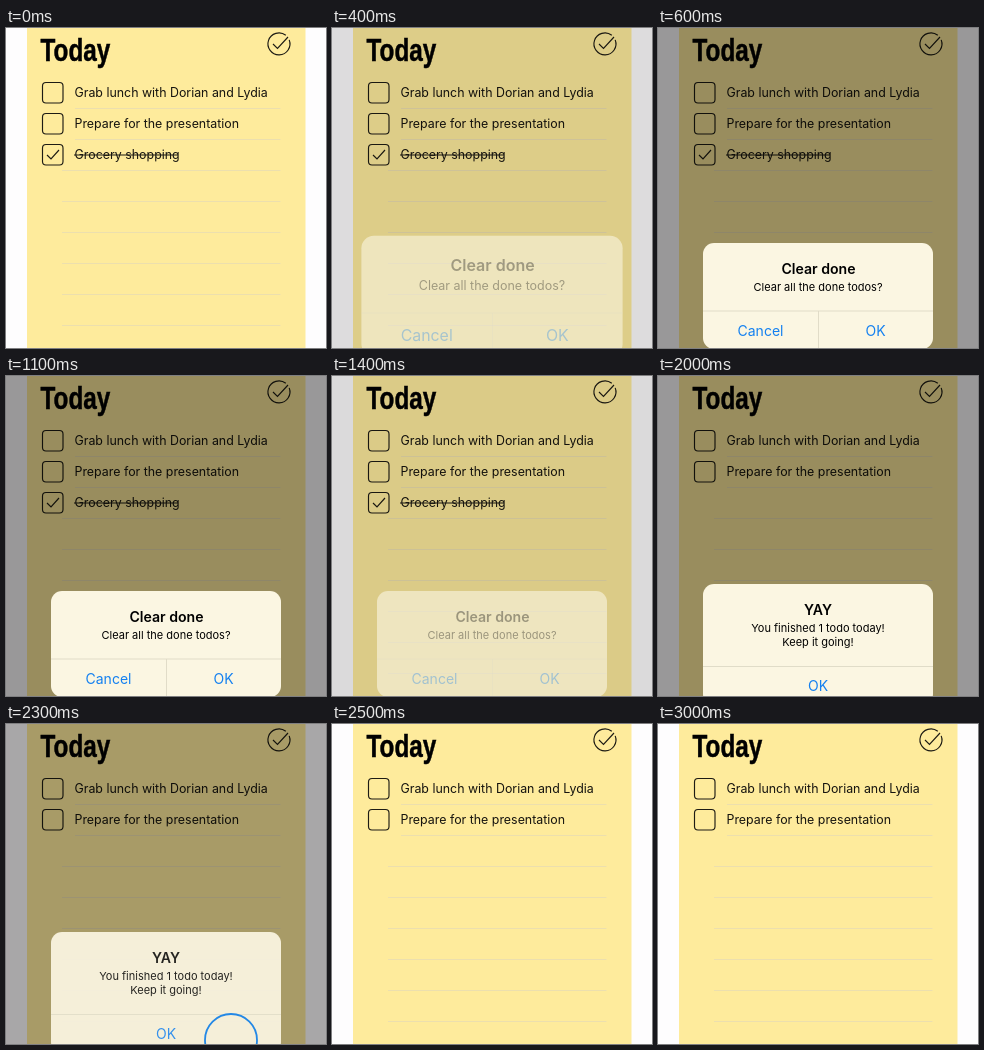
An HTML page for the animation above (3.1 s loop, 320x320 px).

```html
<!DOCTYPE html>
<html lang="en">
<head>
<meta charset="utf-8">
<title>Todo list</title>
<style>
  html, body { margin: 0; height: 100%; overflow: hidden; background: #fefdfe; }
  svg { display: block; width: 320px; height: 320px; }
  text { font-family: Inter, "Liberation Sans", sans-serif; fill: #16140f; }
  .heading { font: bold 32px "Liberation Sans", Arial, sans-serif; fill: #000; stroke: #000; stroke-width: .5; }
  .todo { font-size: 12.4px; }
  .ink { fill: none; stroke: #1d1b14; stroke-width: 1.15; }
  .rule { stroke: #ecdfae; stroke-width: 1; }
  .alert text { text-anchor: middle; fill: #000; }
  .alert .title { font-size: 14.1px; font-weight: 600; }
  .alert .message { font-size: 11px; }
  .alert .button { font-size: 14px; fill: #1480f0; }
  .panel { fill: #fbf6e2; }
  .divider { stroke: #dedac6; stroke-width: .9; fill: none; }
  #tap { fill: none; stroke: #2388e6; stroke-width: 1.8; }
</style>
</head>
<body>
<svg viewBox="0 0 320 320">
  <rect x="21" width="278.5" height="320" fill="#feeb9c"/>
  <g id="rules"></g>
  <text class="heading" transform="translate(34.5 32.500) scale(.76 1)">Today</text>
  <g class="ink">
    <path d="M283.200 11.900A11 11 0 1 1 279.800 7.300"/>
    <path d="M267 16l4.500 4.500L282 9"/>
  </g>
  <g id="todos"></g>
  <g id="done">
    <path class="ink" d="M41 127l4 4 8-9"/>
    <path class="ink" d="M68 127H172"/>
  </g>
  <rect id="dim" width="320" height="320"/>
  <g id="confirm" class="alert">
    <rect class="panel" x="45" y="215" width="230" height="106" rx="11"/>
    <g class="content">
      <path class="divider" d="M45 283H275M160.500 283V321"/>
      <text class="title" x="160.500" y="246">Clear done</text>
      <text class="message" x="160" y="263">Clear all the done todos?</text>
      <text class="button" x="102.500" y="308">Cancel</text>
      <text class="button" x="217.500" y="308">OK</text>
    </g>
  </g>
  <g id="praise" class="alert">
    <rect class="panel" x="45" y="208" width="230" height="121" rx="11"/>
    <g class="content">
      <path class="divider" d="M45 290.500H275"/>
      <text class="title" x="160" y="239">YAY</text>
      <text class="message" x="160" y="256">You finished 1 todo today!</text>
      <text class="message" x="160" y="270">Keep it going!</text>
      <text class="button" x="160" y="315">OK</text>
    </g>
  </g>
  <circle id="tap" r="26"/>
</svg>
<script>
const LOOP = 3100, ENTER = 320, EXIT = 250, CLEARED = 1550;
const ROW = 31, FIRST_ROW = 65;
const $ = id => document.getElementById(id);

const alerts = [
  { node: $('confirm'), open: 280, close: 1250 },
  { node: $('praise'), open: 1590, close: 2240 },
];
const taps = [
  { from: 80, to: 310, x: 273, y: 16 },
  { from: 1150, to: 1350, x: 225, y: 310 },
  { from: 2140, to: 2340, x: 225, y: 316 },
];

const todo = (label, row) => {
  const y = FIRST_ROW + row * ROW;
  return `<rect class="ink" x="36.5" y="${y - 10.5}" width="20.5" height="20.5" rx="3.5"/>
    <text class="todo" x="68.5" y="${y + 4}">${label}</text>`;
};
$('todos').innerHTML = ['Grab lunch with Dorian and Lydia', 'Prepare for the presentation'].map(todo).join('');
$('done').insertAdjacentHTML('afterbegin', todo('Grocery shopping', 2));
for (let row = 0; row < 8; row++) {
  const y = 80.5 + row * ROW;
  $('rules').insertAdjacentHTML('beforeend', `<path class="rule" d="M${row < 2 ? 69 : 56} ${y}H274.5"/>`);
}

const ease = x => {
  x = Math.min(1, Math.max(0, x));
  return x * x * (3 - 2 * x);
};

function draw(t) {
  let shade = 0;
  for (const { node, open, close } of alerts) {
    const entered = ease((t - open) / ENTER);
    const opacity = entered * (1 - ease((t - close) / EXIT));
    const scale = 1.2 - 0.2 * entered;
    // The panel turns solid sooner than the text on it.
    node.querySelector('.panel').setAttribute('opacity', opacity ** 0.45);
    node.querySelector('.content').setAttribute('opacity', opacity);
    node.setAttribute('transform', `translate(160 268) scale(${scale}) translate(-160 -268)`);
    shade = Math.max(shade, opacity);
  }
  $('dim').setAttribute('opacity', 0.4 * shade);
  $('done').style.display = t < CLEARED ? '' : 'none';

  const tap = taps.find(({ from, to }) => t >= from && t < to);
  $('tap').style.display = tap ? '' : 'none';
  if (tap) $('tap').setAttribute('transform', `translate(${tap.x} ${tap.y})`);
}

function tick() {
  draw(performance.now() % LOOP);
  requestAnimationFrame(tick);
}
tick();
</script>
</body>
</html>
```
